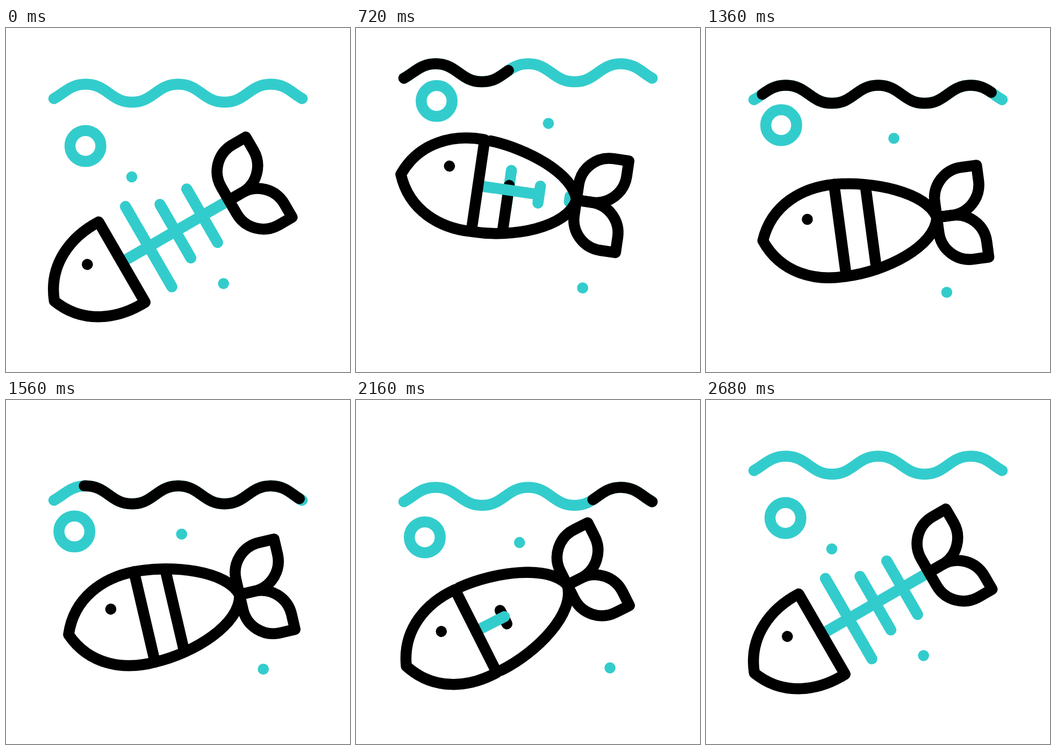
Animation of 640x640 px, one loop 3 s. Source, as an HTML page:

```html
<!DOCTYPE html>
<html lang="en">
<head>
<meta charset="utf-8">
<title>Fish and bones</title>
<style>
  html, body { margin: 0; width: 100%; height: 100%; overflow: hidden; background: #fff; }
  svg { display: block; width: 100%; height: 100%; }
  .line { fill: none; stroke: #000; stroke-width: 20.5; stroke-linecap: round; stroke-linejoin: round; }
  .teal { stroke: #33cccc; }
  .dot { fill: #33cccc; }
</style>
</head>
<body>
<svg viewBox="0 0 640 640">
  <defs>
    <path id="swell" pathLength="1" d="M89.1 131.3C108.1 121.5 119.7 104.5 148.3 104.5C188.3 104.5 194.4 138 234.4 138S280.5 104.5 320.5 104.5S366.6 138 406.6 138S452.7 104.5 492.7 104.5C521.3 104.5 532.3 121.5 551 131.3"/>
  </defs>
  <g id="wave">
    <use href="#swell" class="line teal"/>
    <path id="ink" class="line" pathLength="1"/>
  </g>
  <circle id="bubble" class="line teal" r="28.75"/>
  <circle id="dotA" class="dot" r="10.3"/>
  <circle id="dotB" class="dot" r="10.3"/>
  <!-- Fish space: x runs along the spine, 0 is the back of the head -->
  <g id="fish">
    <path id="rib1" class="line teal"/>
    <path id="rib2" class="line teal"/>
    <path id="rib3" class="line teal"/>
    <path id="stripe" class="line"/>
    <path id="spine" class="line teal"/>
    <g id="rear">
      <path id="back" class="line" pathLength="1" d="M230 0C216 -50 120 -83 48 -86.3"/>
      <path id="belly" class="line" pathLength="1" d="M230 0C220 54 122 87 48 86.3"/>
      <path class="line" d="M230 0V-28.7A57.5 57.5 0 0 1 287.5 -86.2H316V-57.5A57.5 57.5 0 0 1 258.5 0Z"/>
      <path class="line" d="M230 0V28.7A57.5 57.5 0 0 0 287.5 86.2H316V57.5A57.5 57.5 0 0 0 258.5 0Z"/>
    </g>
    <path class="line" d="M0 -86.3C-58 -88.5 -120 -65 -145 0C-120 65 -58 88.5 0 86.3Z"/>
    <circle cx="-57.8" cy="-28.3" r="10.3"/>
  </g>
</svg>
<script>
const LOOP = 3000, STEP = 40, PIVOT = 125;
const $ = id => document.getElementById(id);
$('ink').setAttribute('d', $('swell').getAttribute('d'));

const set = (id, attrs) => {
  for (const k in attrs) $(id).setAttribute(k, attrs[k]);
};

// Progress from a to b along cubic-bezier(x1, 0, x2, 1)
function ease(t, a, b, x1 = 1 / 3, x2 = 2 / 3) {
  const x = (t - a) / (b - a);
  if (x <= 0) return 0;
  if (x >= 1) return 1;
  let lo = 0, hi = 1;
  for (let i = 0; i < 24; i++) {
    const s = (lo + hi) / 2, r = 1 - s;
    if (3 * x1 * s * r * r + 3 * x2 * s * s * r + s * s * s < x) lo = s;
    else hi = s;
  }
  return lo * lo * (3 - 2 * lo);
}

// Rest -> high -> low -> rest
const blend = (p, rest, high, low) => rest.map((v, i) =>
  v + (high[i] - v) * p[0] + (low[i] - high[i]) * p[1] + (v - low[i]) * p[2]);

function trim(id, from, to) {
  const len = to - from;
  set(id, {
    visibility: len > 0.0005 ? 'visible' : 'hidden',
    'stroke-dasharray': `${Math.max(len, 0.0005)} 9`,
    'stroke-dashoffset': -from
  });
}

function bar(id, x0, y0, x1, y1) {
  const shown = Math.hypot(x1 - x0, y1 - y0) > 0.05;
  set(id, {
    visibility: shown ? 'visible' : 'hidden',
    d: `M${x0} ${y0}L${x1} ${y1}`
  });
}

function rib(id, x, half, size) {
  bar(id, x, -half * size, x, half * size);
}

function place(id, [x, y]) {
  set(id, { cx: x, cy: y });
}

function draw(t) {
  const sea = [
    ease(t, 120, 920, 0.54, 0.39),
    ease(t, 1080, 1797, 0.453, 0.4),
    ease(t, 1880, 2592, 0.71, 0.4)
  ];
  const swim = [
    ease(t, 120, 932, 0.333, 0.4),
    ease(t, 1010, 1625, 0.333, 0.4),
    ease(t, 1800, 2440, 0.333, 0.313)
  ];

  const [lift] = blend(sea, [0], [-41], [71]);
  set('wave', { transform: `translate(0 ${lift})` });
  trim('ink', ease(t, 1091, 2680, 0.55, 0.55), ease(t, 120, 1783, 0.466, 0.24));

  place('bubble', blend(sea, [147.8, 219.5], [150.2, 129], [123.5, 263.5]));
  place('dotA', blend(sea, [234, 277], [368, 169.5], [320, 262.5]));
  place('dotB', blend(sea, [404.7, 475.5], [423, 484.3], [487.8, 503.5]));

  const [x, y, turn] = blend(swim, [323.8, 373, -30], [352.8, 306.4, 11.45], [379.7, 375.9, -13.4]);
  set('fish', { transform: `translate(${x} ${y}) rotate(${turn}) translate(${-PIVOT} 0)` });
  set('rear', { transform: `translate(${-48.5 * (sea[0] - sea[2])} 0)` });

  const gone = ease(t, 2190, 2640);
  trim('back', 0, ease(t, 120, 800) - gone);
  trim('belly', 0, ease(t, 120, 735) - gone);

  const cut = 77 * ease(t, 1880, 2300, 0.4, 0.5);
  const top = 77 - 154 * ease(t, 440, 960);
  bar('stripe', 57.5, top + cut, 57.5, 77 - cut);

  bar('spine', 0, 0, 229 * (1 - ease(t, 440, 1000) + ease(t, 2000, 2480)), 0);
  rib('rib1', 57.5, 86.3, 1 - ease(t, 413, 973) + ease(t, 2170, 2540));
  rib('rib2', 115, 57.5, 1 - ease(t, 354, 914) + ease(t, 2240, 2610));
  rib('rib3', 172.5, 57.5, 1 - ease(t, 267, 827) + ease(t, 2310, 2680));
}

let start;
function tick(now) {
  if (start === undefined) start = now;
  draw(Math.floor(((now - start) % LOOP) / STEP) * STEP);
  requestAnimationFrame(tick);
}
draw(0);
requestAnimationFrame(tick);
</script>
</body>
</html>
```
